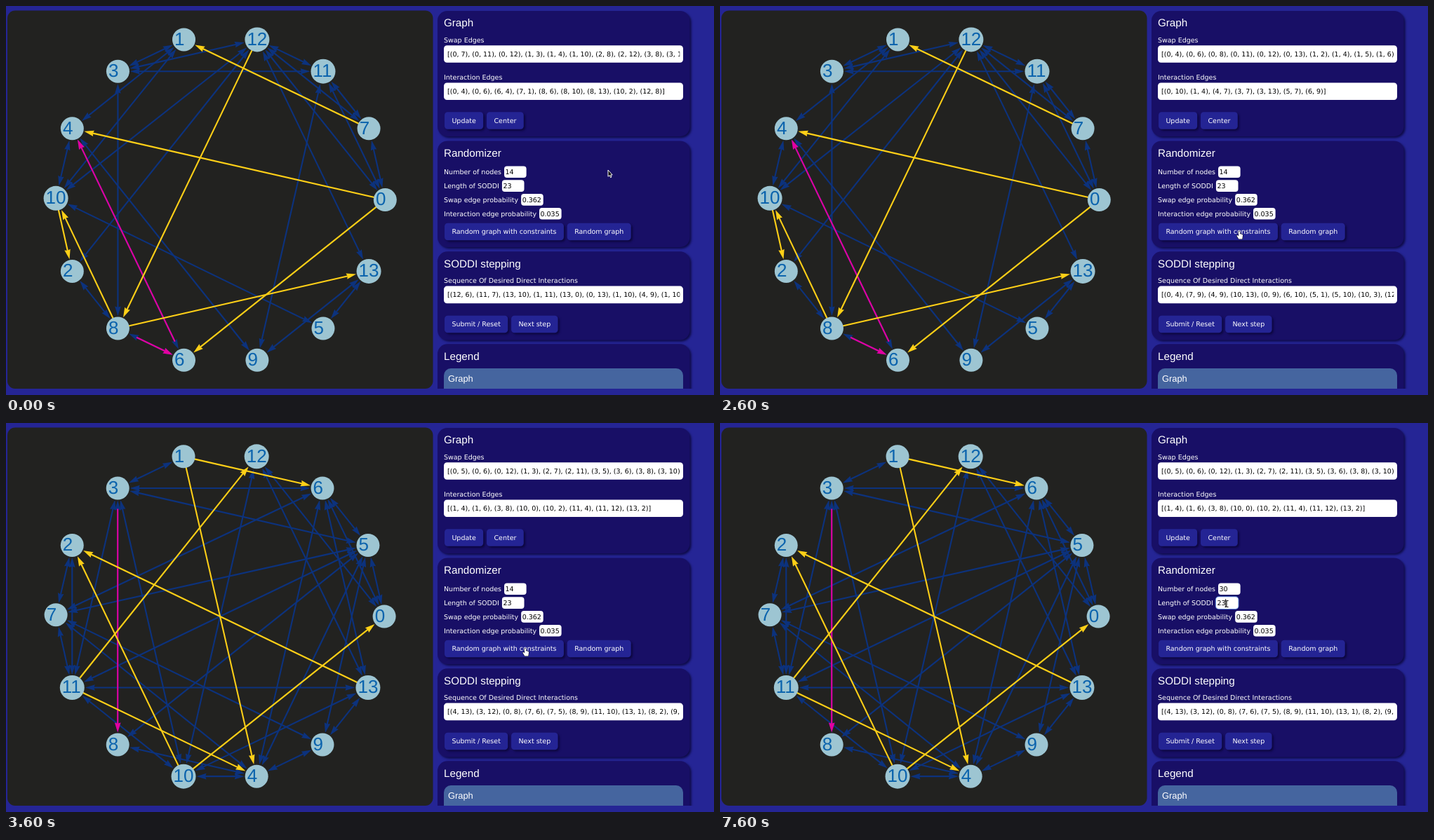
Write an HTML page with a canvas that moves like this. It is 1009 by 555 pixels and loops after 8000 ms.

```html
<!DOCTYPE html>
<html lang="en">
<head>
<meta charset="utf-8">
<style>
html, body { margin: 0; width: 100%; height: 100%; overflow: hidden; background: #252595; }
canvas { display: block; }
</style>
</head>
<body>
<canvas id="stage" width="1009" height="555"></canvas>
<script>
const ctx = document.getElementById('stage').getContext('2d');
ctx.textRendering = 'geometricPrecision';

const LOOP = 8000, STEP = 100, LEFT = 624, RIGHT = 965;
const UI = '9.5px "DejaVu Sans", sans-serif';
const sans = size => `${size}px "Liberation Sans", Arial, sans-serif`;
const BLUE = '#0c327d', YELLOW = '#ffd017', MAGENTA = '#e3009f';
const PANEL = '#180f66', BUTTON = '#242494';

// "0:4,6-8" links node 0 to 4, 6, 7 and 8
const parseLinks = text => text.split(' ').flatMap(group => {
  const [from, targets] = group.split(':');
  return targets.split(',').flatMap(range => {
    const [first, last = first] = range.split('-').map(Number);
    return Array.from({ length: last - first + 1 }, (_, i) => [+from, first + i]);
  });
});
const parsePairs = text => [...text.matchAll(/\((\d+), (\d+)\)/g)].map(m => [+m[1], +m[2]]);
const formatPairs = pairs => '[' + pairs.map(([a, b]) => `(${a}, ${b})`).join(', ') + ']';

// Nodes sit counterclockwise on a ring in the order the edges first mention them
function makeGraph(radius, links, interactions, soddi) {
  const swapEdges = parseLinks(links);
  const order = [...new Set(swapEdges.flat())];
  const nodes = {};
  order.forEach((id, i) => {
    const angle = 2 * Math.PI * i / order.length;
    nodes[id] = {
      x: 71.1 + radius * (1 + Math.cos(angle)),
      y: 42 + radius * (1 - Math.sin(angle)) - (i === order.length / 2 ? 2.3 : 0),
      r: id > 9 ? 17.5 : 16.5
    };
  });
  return {
    nodes, swapEdges, interactions, soddi,
    interactionEdges: parsePairs(interactions),
    swapText: formatPairs(swapEdges)
  };
}

const graphs = [
  makeGraph(234.6,
    '0:7,11-12 1:3-4,10 2:8,12 3:8,11-12 4:6,9-10 5:10,13 6:8 7:11-12 9:11,13 10:12 11:12 12:13',
    '[(0, 4), (0, 6), (6, 4), (7, 1), (8, 6), (8, 10), (8, 13), (10, 2), (12, 8)]',
    '[(12, 6), (11, 7), (13, 10), (1, 11), (13, 0), (0, 13), (1, 10), (4, 9), (1, 10)]'),
  makeGraph(234,
    '0:4,6,8,11-13 1:2,4-7 2:6,10 3:4-5,7-9 4:8,11-13 5:6-9,11-12 6:8-10 7:12-13 8:10-11 9:10-13 10:13 11:12-13 12:13',
    '[(0, 10), (1, 4), (4, 7), (3, 7), (3, 13), (5, 7), (6, 9)]',
    '[(0, 4), (7, 9), (4, 9), (10, 13), (0, 9), (6, 10), (5, 1), (5, 10), (10, 3), (12, 1)]'),
  makeGraph(234,
    '0:5-6,12 1:3 2:7,11 3:5-6,8,10-11 4:5-10 5:6-9,11 6:7,13 7:9,11 9:13 10:11-13 11:13 12:13',
    '[(1, 4), (1, 6), (3, 8), (10, 0), (10, 2), (11, 4), (11, 12), (13, 2)]',
    '[(4, 13), (3, 12), (0, 8), (7, 6), (7, 5), (8, 9), (11, 10), (13, 1), (8, 2), (9, 5)]')
];

function box(x, y, w, h, radius, fill) {
  ctx.beginPath();
  ctx.roundRect(x, y, w, h, radius);
  ctx.fillStyle = fill;
  ctx.fill();
}

function raisedBox(x, y, w, h, radius, fill) {
  ctx.save();
  ctx.shadowColor = 'rgba(8,4,50,.75)';
  ctx.shadowBlur = 3;
  ctx.shadowOffsetX = ctx.shadowOffsetY = 2.2;
  box(x, y, w, h, radius, fill);
  ctx.restore();
}

function label(text, x, y, font = UI, fill = '#fff') {
  ctx.font = font;
  ctx.fillStyle = fill;
  ctx.fillText(text, x, y);
}

function textWidth(text) {
  ctx.font = UI;
  return ctx.measureText(text).width;
}

function buttonRow(y, names, pressed) {
  let x = LEFT + 1;
  for (const name of names) {
    const w = textWidth(name) + 20.8;
    (name === pressed ? box : raisedBox)(x, y, w, 24.4, 4.5, BUTTON);
    label(name, x + 10.4, y + 15.4);
    x += w + 4.8;
  }
}

function textField(name, text, y) {
  label(name, LEFT, y - 4.4);
  box(LEFT, y, RIGHT - LEFT, 24.6, 4.5, '#fff');
  ctx.save();
  ctx.beginPath();
  ctx.rect(LEFT + 4, y, 332.3, 25);
  ctx.clip();
  label(text, LEFT + 5, y + 15.4, UI, '#000');
  ctx.restore();
}

const FIELD_W = 31.6, FIELD_H = 16.6;
const fields = ['Number of nodes', 'Length of SODDI', 'Swap edge probability', 'Interaction edge probability']
  .map((name, i) => ({ name, x: LEFT + textWidth(name) + 4, y: 228.5 + 19.8 * i }));

function numberField({ name, x, y }, value, focused, caret) {
  label(name, LEFT, y + 11.8);
  if (focused) box(x - 1, y - 1, FIELD_W + 2, FIELD_H + 2, 5, '#5b83d6');
  box(x, y, FIELD_W, FIELD_H, 4, '#fff');
  label(value, x + 1.5, y + 11.8, UI, '#000');
  if (focused && caret) ctx.fillRect(x + 1.3 + textWidth(value), y + 2.7, 0.9, 11.4);
}

// Line from a to b with an arrowhead at b, and one at a when both is set
function edge(a, b, color, both, gap = 0) {
  const start = a.r + 1;
  const end = Math.hypot(b.x - a.x, b.y - a.y) - b.r - 1;
  const head = (tip, dir) => {
    ctx.beginPath();
    ctx.moveTo(tip, 0);
    ctx.lineTo(tip - 14 * dir, 4.3);
    ctx.lineTo(tip - 12.6 * dir, 0);
    ctx.lineTo(tip - 14 * dir, -4.3);
    ctx.fill();
  };
  ctx.save();
  ctx.translate(a.x, a.y);
  ctx.rotate(Math.atan2(b.y - a.y, b.x - a.x));
  ctx.strokeStyle = ctx.fillStyle = color;
  ctx.lineWidth = 2.1;
  ctx.beginPath();
  ctx.moveTo(both ? start + 12 : gap, 0);
  ctx.lineTo(end - 12, 0);
  ctx.stroke();
  head(end, 1);
  if (both) head(start, -1);
  ctx.restore();
}

function drawGraph({ nodes, swapEdges, interactionEdges }) {
  box(2, 6.5, 606.5, 539.5, 11, '#222220');
  for (const [a, b] of swapEdges) edge(nodes[a], nodes[b], BLUE, true);
  for (const [a, b] of interactionEdges) {
    const shared = swapEdges.some(e => e.includes(a) && e.includes(b));
    edge(nodes[a], nodes[b], shared ? MAGENTA : YELLOW, false, shared ? nodes[a].r + 13 : 0);
  }
  for (const id in nodes) {
    const { x, y, r } = nodes[id];
    ctx.beginPath();
    ctx.arc(x, y, r, 0, 2 * Math.PI);
    ctx.fillStyle = '#9dc5d2';
    ctx.fill();
    label(id, x - (id > 9 ? 14.5 : 13.4), y + 7.8, sans(26), '#0b63ad');
  }
}

function panel(title, top, bottom) {
  raisedBox(615, top, 359.5, bottom - top, 14, PANEL);
  label(title, LEFT, top + 22.4, sans(15.2));
}

function typedCount(t) {
  if (t < 5500) return '14';
  if (t < 5800) return '1';
  return '30'.slice(0, (t - 5800) / STEP);
}

function drawPanels(t, form) {
  ctx.save();
  ctx.beginPath();
  ctx.rect(610, 0, 399, 546);
  ctx.clip();

  panel('Graph', 7, 186);
  textField('Swap Edges', form.swapText, 56.2);
  textField('Interaction Edges', form.interactions, 109.4);
  buttonRow(151.3, ['Update', 'Center']);

  panel('Randomizer', 192.5, 344);
  const focus = t < 4300 ? -1 : t < 7400 ? 0 : 1;
  const caret = t < 6700 || t >= 7600;
  [typedCount(t), '23', '0.362', '0.035'].forEach((value, i) =>
    numberField(fields[i], value, focus === i, caret));
  const randomize = 'Random graph with constraints';
  buttonRow(309.8, [randomize, 'Random graph'], (t === 2500 || t === 3400) && randomize);

  panel('SODDI stepping', 350.3, 476.5);
  textField('Sequence Of Desired Direct Interactions', form.soddi, 399.6);
  buttonRow(441.8, ['Submit / Reset', 'Next step']);

  panel('Legend', 482.3, 600);
  box(LEFT, 517, RIGHT - LEFT, 80, 10, '#45659f');
  label('Graph', LEFT + 6, 535.8, sans(12.85));
  ctx.restore();
}

// Each glide: begin and end time, then where the pointer comes to rest
const home = [858, 234];
const glides = [
  [700, 900, 824, 263],
  [1000, 1800, 740, 321],
  [3600, 4100, 732.5, 241],
  [6800, 7200, 722, 258]
];

function pointerAt(t) {
  let [x, y] = home;
  for (const [begin, end, toX, toY] of glides) {
    const k = Math.min(1, Math.max(0, (t - begin) / (end - begin)));
    const eased = k * k * (3 - 2 * k);
    x += (toX - x) * eased;
    y += (toY - y) * eased;
  }
  return [x, y];
}

const arrowShape = new Path2D('M0 0V9.3L2.1 7.5L3.6 10.7L5 10L3.6 7H6.2Z');
const handShape = new Path2D('M-.9 .8Q0-.5 .9 .8V4L4 4.7Q5.2 5 5 6.5L4.3 11.5H-.7L-3.5 7Q-3.6 5.7-2.4 6L-.9 7.2Z');
const beamShape = new Path2D('M-2.5-4.5H-.7L0-4L.7-4.5H2.5M0-4V4M-2.5 4.5H-.7L0 4L.7 4.5H2.5');

function drawPointer(t) {
  const [x, y] = pointerAt(t);
  const inField = fields.some(f => x > f.x && x < f.x + FIELD_W && y > f.y && y < f.y + FIELD_H);
  const onButton = y > 310 && x < 795;
  ctx.save();
  ctx.translate(x, y);
  ctx.lineWidth = 1;
  ctx.strokeStyle = onButton || inField ? '#000' : '#fff';
  ctx.fillStyle = onButton ? '#fff' : '#000';
  if (inField) {
    ctx.stroke(beamShape);
  } else if (onButton) {
    ctx.stroke(handShape);
    ctx.fill(handShape);
  } else {
    ctx.fill(arrowShape);
    ctx.stroke(arrowShape);
  }
  ctx.restore();
}

const start = performance.now();
function draw(now) {
  // The screen advances in tenths of a second
  const t = Math.floor(Math.max(0, now - start) % LOOP / STEP) * STEP;
  ctx.fillStyle = '#252595';
  ctx.fillRect(0, 0, 1009, 555);
  drawGraph(graphs[t < 2700 ? 0 : t < 3600 ? 1 : 2]);
  drawPanels(t, graphs[t < 2600 ? 0 : t < 3600 ? 1 : 2]);
  drawPointer(t);
  requestAnimationFrame(draw);
}
draw(start);
</script>
</body>
</html>
```
